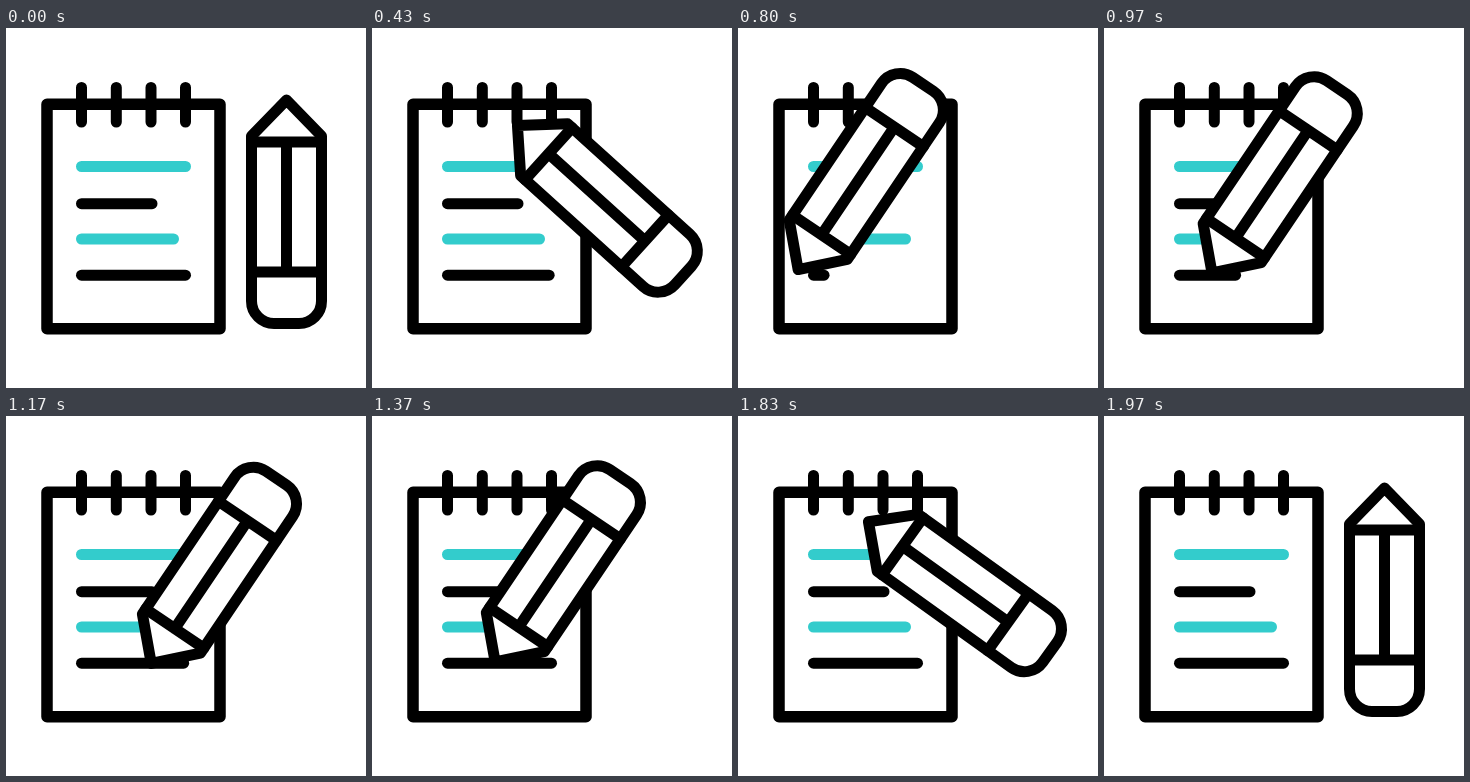
These frames come from a looping animation (360x360 px, 2.5 s). An HTML page:

```html
<!DOCTYPE html>
<html lang="en">
<head>
<meta charset="utf-8">
<title>Notepad and pencil</title>
<style>
  html, body { margin: 0; width: 100%; height: 100%; overflow: hidden; background: #fff; }
  svg { display: block; width: 100vw; height: 100vh; }
  g { fill: #fff; stroke: #000; stroke-width: 11; stroke-linecap: round; stroke-linejoin: round; }
  .teal { stroke: #33cccc; }
</style>
</head>
<body>
<svg viewBox="0 0 360 360">
  <g>
    <path stroke-width="11.5" d="M41 76.3H214V300.7H41Z"/>
    <path d="M75.5 59.5V94M110.3 59.5V94M145 59.5V94M179.5 59.5V94"/>
    <path class="teal" d="M75.5 138.5H179.5M75.5 211H167.5"/>
    <path d="M75.5 175.7H146"/>
    <path id="line"/>
  </g>
  <!-- Drawn around its own centre, tip up -->
  <g id="pencil">
    <path d="M0 -111L35 -75V90A22.5 22.5 0 0 1 12.5 112.5H-12.5A22.5 22.5 0 0 1 -35 90V-75Z"/>
    <path d="M-35 -69H35M0 -69V61M-35 61H35"/>
  </g>
</svg>
<script>
  const LOOP = 2500, FRAME = 100 / 3;
  // Key moments, counted in frames of 1/30 s
  const LEAVE = 9.1, ARRIVE = 21, WRITTEN = 36.2, RETURN = 48.25, HOME = 59;
  const home = { x: 280.5, y: 183 };
  const write = { x: 119.5, y: 149.4, angle: -146, dx: 88, dy: 6 };
  const line = document.getElementById('line');
  const pencil = document.getElementById('pencil');

  const part = (f, from, to) => Math.min(1, Math.max(0, (f - from) / (to - from)));
  const mix = (a, b, p) => a + (b - a) * p;
  const cubic = p => p < .5 ? 4 * p ** 3 : 1 - 4 * (1 - p) ** 3;
  const smooth = p => p * p * (3 - 2 * p);

  function draw(f) {
    const away = part(f, LEAVE, ARRIVE) - part(f, RETURN, HOME);
    const slide = cubic(part(f, ARRIVE, WRITTEN)) - cubic(part(f, WRITTEN, RETURN));
    const x = mix(home.x, write.x, away) + write.dx * slide;
    const y = mix(home.y, write.y, away) + write.dy * slide;
    pencil.setAttribute('transform', `translate(${x} ${y}) rotate(${write.angle * away})`);

    const ink = f < ARRIVE
      ? 1 - part(f, LEAVE, ARRIVE) ** 3.4
      : smooth(part(f, ARRIVE, WRITTEN));
    line.setAttribute('d', ink > 0 ? `M75.5 247.2H${mix(75.5, 179.5, ink)}` : '');
  }

  const start = performance.now();
  function tick() {
    const t = (performance.now() - start) % LOOP;
    draw(Math.floor((t + 5) / FRAME));
    requestAnimationFrame(tick);
  }
  tick();
</script>
</body>
</html>
```
